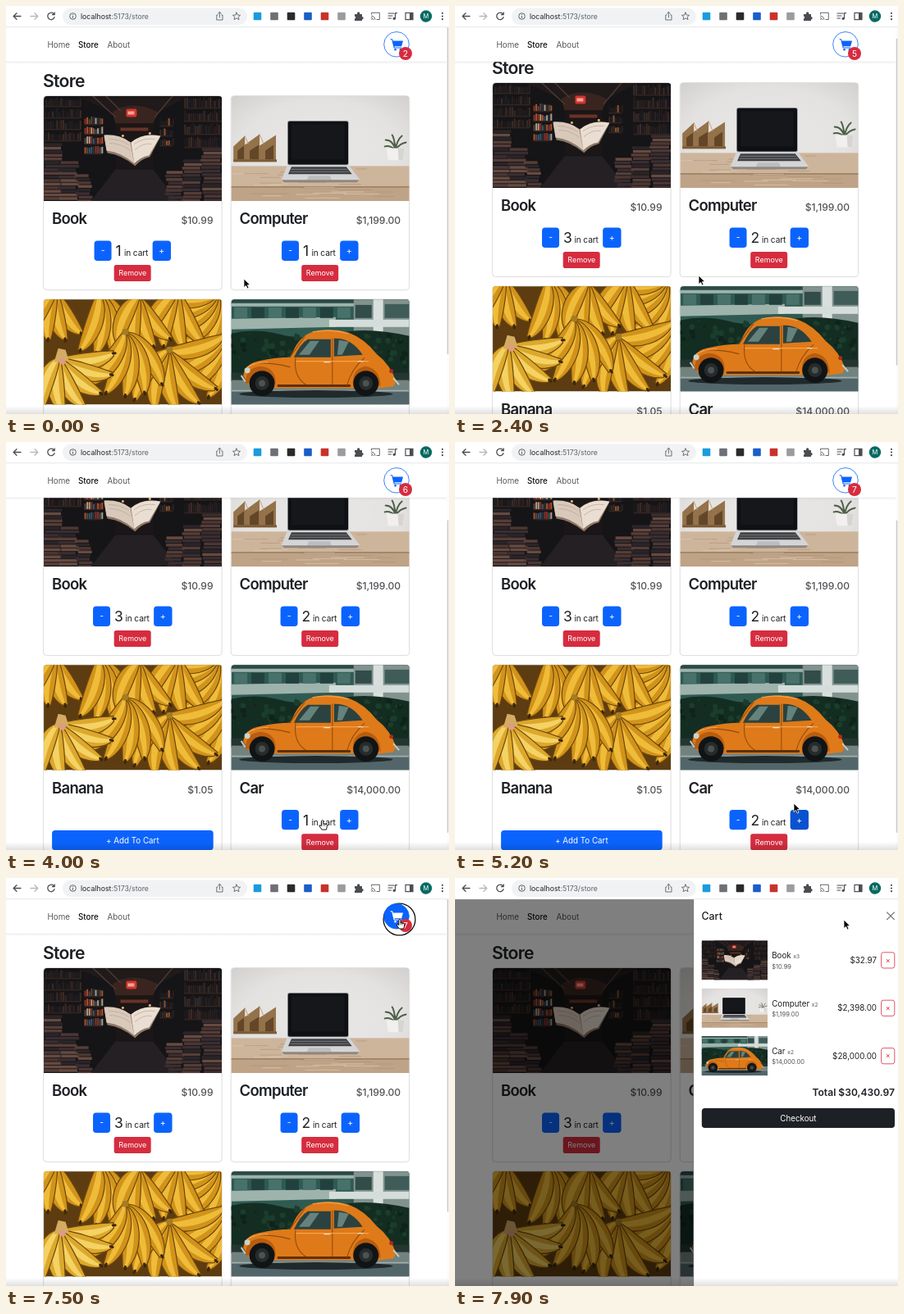
Animation of 540 by 498 pixels, one loop 8000 ms. Source, as an HTML page:

```html
<!DOCTYPE html>
<html lang="en">
<head>
<meta charset="utf-8">
<title>Store</title>
<style>
html, body { margin: 0; width: 100%; height: 100%; overflow: hidden; background: #fff; }
svg { display: block; }
#stage { width: 540px; height: 498px; }
text { font-family: Inter, Roboto, "Liberation Sans", sans-serif; white-space: pre; }
</style>
</head>
<body>
<svg id="stage" viewBox="0 0 540 498"></svg>
<script>
const LOOP = 8000, BLUE = '#0b63fd', DARK_BLUE = '#0a52cf', RED = '#d62c3f', INK = '#1d2024', MUTED = '#505357';

// Markup helpers
const text = (x, y, s, size, fill = INK, more = '') =>
  `<text x="${x}" y="${y}" font-size="${size}" fill="${fill}" ${more}>${s}</text>`;
const rect = (x, y, w, h, fill, more = '') =>
  `<rect x="${x}" y="${y}" width="${w}" height="${h}" fill="${fill}" ${more}/>`;
const circle = (x, y, r, fill, more = '') => `<circle cx="${x}" cy="${y}" r="${r}" fill="${fill}" ${more}/>`;
const path = (d, fill, more = '') => `<path d="${d}" fill="${fill}" ${more}/>`;
const line = (d, color, w = 1, more = '') =>
  path(d, 'none', `stroke="${color}" stroke-width="${w}" stroke-linecap="round" stroke-linejoin="round" ${more}`);
const group = (id, body, more = '') => `<g id="${id}" ${more}>${body}</g>`;
const MID = 'text-anchor="middle"', END = 'text-anchor="end"', TITLE = 'font-weight="600" letter-spacing="-.75"';

function randomizer(seed) {
  return () => (seed = (seed * 16807) % 2147483647) / 2147483647;
}

// Pictures, each 218 by 129
function library() {
  const rnd = randomizer(77);
  const pick = list => list[Math.floor(rnd() * list.length)];
  let s = rect(0, 0, 218, 129, '#151417');
  const shelf = (x0, x1, y0, y1, step, colors) => {
    for (let y = y0; y < y1; y += step) {
      s += rect(x0, y + step - 1.5, x1 - x0, 1.5, '#33251f');
      for (let x = x0; x < x1; x += 2.6) {
        const h = (step - 3) * (0.6 + 0.4 * rnd());
        s += rect(x.toFixed(1), (y + step - 1.5 - h).toFixed(1), 2, h.toFixed(1), pick(colors));
      }
    }
  };
  const dim = ['#1d1a1d', '#2b2222', '#3a2b26', '#1f2025', '#2a1d1b'];
  const vivid = ['#a9512b', '#b39d84', '#35566c', '#8c3328', '#57463c', '#27303a'];
  shelf(0, 46, 0, 56, 14, dim);
  shelf(172, 218, 0, 64, 16, dim);
  shelf(50, 72, 24, 72, 12, vivid);
  shelf(142, 158, 26, 62, 12, dim.concat('#8a5433'));
  s += path('M40 0H178L140 20H84Z', '#201a1a') + path('M84 20Q108 4 140 20L134 34H88Z', '#39241f');
  s += line('M60 0L88 26M158 0L136 26M76 0L94 18', '#4b3832', 1.5);
  s += rect(101, 16, 13, 10, '#d0362c', 'rx="2"') + rect(103, 19, 8, 4, '#f3a29a');
  s += rect(88, 34, 46, 55, '#1b1617') + rect(94, 39, 34, 4, '#6b3325') + circle(97, 49, 1.5, '#f2ba73') + circle(130, 46, 1.5, '#f2ba73');
  s += path('M58 129L88 90H134L164 129Z', '#242023');
  const pile = (x, y, n, w) => {
    for (let i = 0; i < n; i++)
      s += rect((x + rnd() * 5).toFixed(1), y + i * 4.4, w, 3.5, pick(['#4c3733', '#3a2d30', '#664a40', '#2a2528', '#563d37']));
  };
  pile(-3, 58, 16, 22); pile(17, 80, 11, 22); pile(38, 96, 8, 17);
  pile(148, 92, 9, 20); pile(168, 78, 12, 22); pile(192, 64, 15, 24);
  s += path('M74 50Q92 48 107 57Q122 44 143 50L130 75Q120 77 112 86Q96 72 78 70Z', '#8d7766');
  s += path('M74 48Q94 47 106 57L111 83Q96 69 77 67Z', '#d9c9bb') + path('M107 57Q122 45 143 49L129 73Q118 75 111 83Z', '#eaded2');
  return s + line('M80 53Q94 53 104 60M81 58Q95 58 106 67M111 59Q122 51 136 53M112 66Q122 57 132 59', '#b8a596', 0.7);
}

function desk() {
  let s = rect(0, 0, 218, 129, 'url(#wall)') + rect(0, 86, 218, 27, '#cdb59b') + rect(0, 111, 218, 18, '#bfa386') + rect(0, 111, 218, 1.2, '#8f7458');
  const rnd = randomizer(9);
  for (let i = 0; i < 26; i++) {
    const x = rnd() * 200, y = 88 + rnd() * 40;
    s += line(`M${x.toFixed(1)} ${y.toFixed(1)}h${(10 + rnd() * 35).toFixed(1)}`, i % 2 ? '#b2947a' : '#dcc8b2', 0.7);
  }
  s += path('M3 80V62L17 49V60L35 47V61L55 48V80Z', '#94724a') + path('M8 78V67L16 61V78ZM23 78V67L34 60V78ZM42 78V67L52 60V78Z', '#634628');
  s += line('M17 49L21 59M35 47L40 59', '#c4a377') + rect(3, 78, 53, 3, '#7b5c38');
  s += rect(69, 30.5, 75, 55, '#9b9da0', 'rx="2.5"') + rect(69.8, 31.2, 73.4, 53, '#0e1014', 'rx="2"') + rect(74, 35, 65, 43, '#15171b');
  s += path('M69 85H144L157 102Q157 105 153 105H66Q62 105 62 102Z', '#d5d5d5') + path('M74 87H141L148 96H70Z', '#3e4044') + path('M95 98H121L123 103H93Z', '#bcbdbe');
  s += line('M74 90H142M73 93H144', '#9b9da0', 0.6) + path('M62 103H157L154 106H65Z', '#8f8780');
  s += line('M201 66Q198 54 189 54M201 66Q200 52 197 48M201 66Q203 54 209 49M201 66Q207 58 214 57M201 66Q194 60 188 62', '#4e6049', 2);
  return s + path('M190 64H212L210 79H192Z', '#f1f0ee') + path('M204 64H212L210 79H205Z', '#d7d5d2');
}

function fruit() {
  let s = rect(0, 0, 218, 129, '#5c3c10');
  // Fans of bananas, all curling the same way from one stem
  const bunch = (x, y, from, to, n, len, bend, pale) => {
    for (let i = 0; i < n; i++) {
      const a = (from + (to - from) * i / (n - 1)) * Math.PI / 180;
      const c = Math.cos(a), d = Math.sin(a);
      const at = (u, v) => `${(x + c * u - d * v).toFixed(1)} ${(y + d * u + c * v).toFixed(1)}`;
      const body = w => `M${at(0, 0)}C${at(len * 0.2, bend - w)} ${at(len * 0.75, bend - w)} ${at(len, -w / 4)}` +
        `L${at(len, w / 4)}C${at(len * 0.75, bend + w)} ${at(len * 0.2, bend + w)} ${at(0, 2)}Z`;
      s += path(body(13), pale ? '#dca82c' : '#d1931a', 'stroke="#6d460c" stroke-width="1.2"') + path(body(5), pale ? '#f4d263' : '#efbc3a');
      s += line(`M${at(len - 1, 0)}L${at(len + 2, 0)}`, '#3b260d', 3);
    }
    s += circle(x, y, 4, '#a57c22');
  };
  bunch(16, -10, 60, 120, 4, 60, 8);
  bunch(214, -6, 105, 180, 5, 72, -9);
  bunch(165, -10, 65, 125, 4, 70, 8);
  bunch(68, -8, 62, 108, 4, 74, -8);
  bunch(118, -4, 55, 115, 4, 64, 9);
  bunch(222, 44, 105, 165, 4, 78, -10);
  bunch(154, 62, 40, 125, 5, 74, 10);
  bunch(100, 40, 55, 125, 5, 78, -9);
  bunch(20, 72, -5, 110, 6, 66, 9, true);
  return s + path('M13 77L18 60L27 62L31 75Z', '#d3ab63') + circle(23, 76, 4, '#df9b83');
}

function street() {
  let s = rect(0, 0, 218, 129, '#2f5a52') + rect(0, 0, 218, 6, '#2b4a46') + path('M0 5H218V9H0ZM0 24L128 22V34L0 37Z', '#9db3ac');
  for (let x = 4; x < 150; x += 21) s += rect(x, 10, 16, 13, x % 2 ? '#22413e' : '#47716a');
  s += path('M150 0H218V46H150Z', '#82938f') + rect(174, 0, 12, 54, '#d9dfdc') + rect(120, 25, 98, 9, '#d5ddda') + rect(188, 6, 30, 17, '#3f5c58') + rect(152, 7, 20, 16, '#314c49');
  const rnd = randomizer(31);
  s += path('M0 42Q30 35 60 43T128 42T218 45V101H0Z', '#142d22');
  for (let i = 0; i < 90; i++)
    s += circle((rnd() * 218).toFixed(1), (42 + rnd() * 46).toFixed(1), (1 + rnd() * 3).toFixed(1), i % 3 ? '#1b3d2b' : '#0f231b');
  s += rect(0, 90, 218, 10, '#24362f') + rect(0, 99, 218, 13, '#72827f') + rect(0, 111, 218, 18, '#52666a') + rect(0, 111, 218, 2, '#a0aca8');
  s += `<ellipse cx="104" cy="116" rx="94" ry="4.5" fill="#202a2c"/>`;
  s += path('M15 94Q17 78 37 75Q55 71 73 71Q81 48 97 41Q121 34 144 41Q163 48 178 67Q195 80 202 101L198 107L181 109H24Z', '#de7a19');
  s += path('M77 71Q85 54 94 49H122V71ZM126 48Q147 47 161 68L126 70Z', '#2b4240') + path('M83 68L97 51H108L96 68ZM132 50L144 52L136 68H130Z', '#66827c');
  s += line('M124 48V104M79 72Q76 95 92 105H142Q147 86 163 72M72 71L90 46M30 78Q54 78 72 83', '#964a0f', 1.1);
  s += path('M54 108Q58 84 36 82Q17 84 18 103H54ZM150 108Q146 86 164 82Q182 84 183 106Z', '#b85d0f');
  s += line('M58 106H145', '#5f300b', 3) + line('M20 83Q32 76 45 77M100 40Q120 36 143 42M80 76H168', '#f6a24a', 1.2);
  for (const x of [38, 165])
    s += circle(x, 103, 15.5, '#111415') + circle(x, 103, 8.5, '#262b2c') + circle(x, 103, 4, '#4c5251');
  s += circle(20, 87, 3.5, '#cdd2c8') + line('M13 94L17 100M199 97L205 104', '#c3cbc7', 2) + circle(196, 88, 2.5, '#b5281c');
  return s + line('M114 77H121M156 76H161', '#e7e1d0', 1.3);
}

const pictures = { Book: library, Computer: desk, Banana: fruit, Car: street };
const goods = [
  { name: 'Book', price: 10.99, x: 45.3, y: 109.2, base: 1, clicks: [900, 1100] },
  { name: 'Computer', price: 1199, x: 273.8, y: 109.2, base: 1, clicks: [1900] },
  { name: 'Banana', price: 1.05, x: 45.3, y: 357.5, base: 0, clicks: [] },
  { name: 'Car', price: 14000, x: 273.8, y: 357.5, base: 0, clicks: [4000, 4700] }
];
const money = v => '$' + v.toLocaleString('en-US', { minimumFractionDigits: 2, maximumFractionDigits: 2 });
const picture = (name, x, y, w, h, more = '') => `<use href="#pic${name}" x="${x}" y="${y}" width="${w}" height="${h}" ${more}/>`;

const button = (id, w, s) =>
  group(id, rect(0, 177.4, w, 24.4, BLUE, 'rx="3.8"') + text(w / 2, 193.2, s, 10.5, '#fff', MID));

function card({ name, price, x, y }) {
  return `<g transform="translate(${x} ${y})">` +
    rect(0.4, 0.4, 217.4, 237, '#fff', `id="frame${name}" rx="4" stroke="#d3d4d5" stroke-width=".8"`) +
    picture(name, 0.4, 0.4, 217.4, 128.6, 'clip-path="url(#top)"') +
    text(10.8, 157.2, name, 18.5, INK, TITLE) +
    text(207.3, 157, money(price), 12.1, MUTED, `font-weight="500" ${END}`) +
    group('add' + name, rect(10.8, 176.5, 196.6, 24.2, BLUE, 'rx="3.8"') + text(109, 192, '+ Add To Cart', 9.8, '#fff', MID)) +
    group('qty' + name,
      button('minus' + name, 21, '-') + button('plus' + name, 22.4, '+') +
      text(0, 196, '', 17.5, INK, `id="num${name}"`) + text(0, 196, 'in cart', 10.2, INK, `id="in${name}" letter-spacing="-.15" ${END}`) +
      rect(86.4, 206.8, 45, 20, RED, 'rx="2.8"') + text(109, 220.2, 'Remove', 9, '#fff', MID)) +
    '</g>';
}

function browserBar() {
  const G = '#5f6368';
  let s = rect(0, 0, 540, 26, '#fff') + rect(0, 25.4, 540, 0.7, '#dcdee0');
  s += line('M18 12.5H9.5M13 8.7L9.2 12.5L13 16.3', '#4a4d51', 1.3) + line('M30 12.5H38.5M35 8.7L38.8 12.5L35 16.3', '#b7b9bc', 1.3);
  s += line('M58.5 10A4.2 4.2 0 1 0 59 13.7M59.2 7.8V10.6H56.4', '#4a4d51', 1.3);
  s += rect(69, 2.5, 225, 20.5, '#f0f2f4', 'rx="10.2"') + circle(81.5, 12.5, 3.8, 'none', `stroke="${G}"`) + line('M81.5 12.3V14.4M81.5 10.4V10.5', G);
  s += text(91, 15.6, 'localhost<tspan fill="#5f6368">:5173/store</tspan>', 8.75, '#202124');
  s += line('M258 11H256.8V17H264V11H262.8M260.4 14V7.5M258.4 9.3L260.4 7.3L262.4 9.3', G, 0.9);
  s += line('M281 8L282.4 11L285.6 11.3L283.2 13.4L284 16.6L281 14.9L278 16.6L278.8 13.4L276.4 11.3L279.6 11Z', G, 0.9);
  [[306.5, '#1b9cdc'], [327, '#6d7074'], [347.5, '#2b2b2b'], [368, '#1b5ec9'], [388.5, '#c9322b'], [409, '#9a9c9f']]
    .forEach(([x, c]) => s += rect(x - 4.8, 7.7, 9.6, 9.6, c, 'rx="1"'));
  s += path('M425 10H428V9A1.7 1.7 0 0 1 431.4 9V10H434V13A1.7 1.7 0 0 1 434 16.4V18H425V15.5A1.6 1.6 0 0 0 425 12.4Z', '#4a4d51');
  s += line('M445.5 10V8.2H455.3V16.5H452M445.5 16.5V16.4M445.5 14.4Q447.5 14.5 447.6 16.5M445.5 12.2Q449.7 12.4 449.8 16.5', G);
  s += line('M466 9H473M466 12H471M466 15H469.5M474.5 15V8.6H476.5', '#4a4d51', 1.2) + circle(473.2, 15.3, 1.6, '#4a4d51');
  s += rect(487, 8.4, 9, 8.2, 'none', 'stroke="#4a4d51" stroke-width="1.2"') + rect(492, 8.4, 4, 8.2, '#4a4d51');
  s += circle(512, 12.5, 7.2, '#066a62') + text(512, 15.2, 'M', 7.5, '#fff', MID);
  return s + [8.8, 12.5, 16.2].map(y => circle(532, y, 1.1, '#4a4d51')).join('');
}

function navbar() {
  return rect(0, 68, 537, 3, 'url(#shade)') + rect(0, 26, 537, 42, '#fff') + rect(0, 67.6, 537, 0.6, '#ececec') +
    text(50.5, 50.6, 'Home', 9.8, '#55585b') + text(88, 50.6, 'Store', 9.8, '#0d0e0f', 'font-weight="500"') + text(123.5, 50.6, 'About', 9.8, '#55585b') +
    circle(479.5, 50.5, 19.4, '#fff', 'id="ring" stroke="#111" stroke-width="1.3"') +
    circle(476, 46.8, 15.3, '#fff', `id="cartDisc" stroke="${BLUE}" stroke-width=".8"`) +
    group('cartIcon', path('M471 42.6H484L482.2 49.3H472.6Z', 'currentColor') +
      line('M469 40.8H470.8L473.2 51H482', 'currentColor', 1.1) + circle(474.6, 53.3, 1.3, 'currentColor') + circle(481, 53.3, 1.3, 'currentColor')) +
    circle(487, 58, 8, RED) + text(487, 61.7, '', 10.3, '#fff', `id="badge" ${MID}`);
}

function cartPanel() {
  let s = rect(291, 26, 249, 472, '#fff') + rect(290.4, 26, 0.7, 472, '#777') +
    text(300.5, 50.8, 'Cart', 12.4, INK, 'font-weight="500"') + line('M526.6 41.8L535.4 50.6M535.4 41.8L526.6 50.6', '#666', 1.1);
  let total = 0;
  goods.filter(g => g.base + g.clicks.length).forEach((g, i) => {
    const n = g.base + g.clicks.length, y = 76.2 + i * 58.4;
    total += n * g.price;
    s += picture(g.name, 300.8, y, 80.2, 48.2) +
      text(386.2, y + 22, `${g.name} <tspan font-size="6.6" fill="${MUTED}">x${n}</tspan>`, 9.8) +
      text(386.2, y + 34.4, money(g.price), 7.5, MUTED) + text(514, y + 27.8, money(n * g.price), 9.8, INK, END) +
      rect(519.6, y + 14.6, 16.2, 19.2, '#fff', `rx="2.6" stroke="${RED}" stroke-width=".8"`) + text(527.7, y + 27.4, '×', 9, RED, MID);
  });
  return s + text(536, 265.6, 'Total ' + money(total), 12.1, INK, `font-weight="600" ${END}`) +
    rect(300.8, 281, 235.2, 24, '#1d2025', 'rx="3.8"') + text(418.4, 296.6, 'Checkout', 9.8, '#fff', MID);
}

const stage = document.getElementById('stage');
stage.innerHTML = `<defs>
  <radialGradient id="wall" r=".75"><stop stop-color="#e9e8e6"/><stop offset=".6" stop-color="#e4e2e0"/><stop offset="1" stop-color="#cfcdcb"/></radialGradient>
  <linearGradient id="shade" x2="0" y2="1"><stop stop-color="#000" stop-opacity=".06"/><stop offset="1" stop-color="#000" stop-opacity="0"/></linearGradient>
  <linearGradient id="floor" y1="1" x2="0" y2="0"><stop stop-color="#000" stop-opacity=".12"/><stop offset="1" stop-color="#000" stop-opacity="0"/></linearGradient>
  <clipPath id="top"><path d="M.4 129V4.4a4 4 0 0 1 4-4h209.4a4 4 0 0 1 4 4V129Z"/></clipPath>
  ${Object.entries(pictures).map(([n, draw]) =>
    `<symbol id="pic${n}" viewBox="0 0 218 129" preserveAspectRatio="xMidYMid slice">${draw()}</symbol>`).join('')}
</defs>` +
  rect(0, 0, 540, 498, '#fff') +
  group('page', text(45, 98.6, 'Store', 21.2, INK, TITLE) + goods.map(card).join('')) +
  navbar() +
  rect(536.8, 26, 3.2, 472, '#fcfcfc') + rect(537.8, 0, 1.5, 0, '#c9c9c9', 'id="thumb" rx=".7"') +
  rect(0, 26, 540, 472, '#000', 'id="shadeOver"') +
  group('panel', cartPanel()) + browserBar() +
  rect(0, 488, 540, 10, 'url(#floor)') +
  group('arrow', path('M0 0V10.6L2.5 8.3L4.2 12L6 11.2L4.4 7.6H7.7Z', '#000', 'stroke="#fff" stroke-width=".8"')) +
  group('hand', path('M-1.2 1.2Q0-.6 1 1.2V4.5L5 5.4Q6 6 5.7 8L4.8 12H-.6L-3.6 7.8Q-4 6.3-2.6 6.6L-1.2 7.6Z', '#fff', 'stroke="#000" stroke-width=".9"') +
    line('M1 4.5V7M3 5V7.2', '#000', 0.6));

const el = Object.fromEntries([...stage.querySelectorAll('[id]')].map(e => [e.id, e]));
const set = (id, attrs) => { for (const k in attrs) el[id].setAttribute(k, attrs[k]); };
const show = (id, on) => { el[id].style.display = on ? '' : 'none'; };
const within = (t, spans) => spans.some(([a, b]) => t >= a && t < b);

// Motion: [time, ...values]
const pointer = [[0, 290, 333], [200, 290, 333], [700, 190, 298], [1300, 190, 298], [1700, 418, 298], [2100, 418, 299],
  [2400, 297, 329], [2600, 297, 329], [3000, 193, 471], [3200, 193, 468], [3700, 384, 462], [4100, 386, 461],
  [4500, 418, 460], [4900, 418, 459], [5200, 413, 441], [5700, 412, 440], [6400, 414, 434], [7200, 480, 50], [7500, 480, 50], [7800, 474, 51]];
const scrolling = [[2300, 0], [2400, 16], [2700, 86], [5200, 86], [5400, 10], [5600, 10], [5700, 0]];
const sliding = [[7500, 0], [7800, 1]];
const fading = [[7500, 0], [7700, 0.5]];
const hands = [[600, 1400], [1700, 2200], [3000, 3300], [3600, 5000], [7100, 7700]];
const hovers = { plusBook: [[600, 1400]], plusComputer: [[1700, 2200]], plusCar: [[4400, 5300]], addCar: [[3600, 4000]] };

function track(keys, t) {
  const i = keys.findIndex(k => k[0] > t);
  if (i === 0) return keys[0].slice(1);
  if (i < 0) return keys[keys.length - 1].slice(1);
  const [a, b] = [keys[i - 1], keys[i]];
  const u = (t - a[0]) / (b[0] - a[0]), e = u * u * (3 - 2 * u);
  return a.slice(1).map((v, j) => v + (b[j + 1] - v) * e);
}

function render(t) {
  const [scroll] = track(scrolling, t);
  const count = g => g.base + g.clicks.filter(c => c <= t).length;
  const grown = count(goods[3]) ? 26 : 0;
  let sum = 0;
  goods.forEach((g, i) => {
    const n = count(g), w = n === 1 ? 93.5 : 96.5, left = 109 - w / 2, extra = i < 2 ? 26 : grown;
    sum += n;
    set('frame' + g.name, { height: 211 + extra });
    show('add' + g.name, !n);
    show('qty' + g.name, n);
    set('add' + g.name, { transform: `translate(0 ${extra})` });
    set('minus' + g.name, { transform: `translate(${left} 0)` });
    set('plus' + g.name, { transform: `translate(${left + w - 22.4} 0)` });
    set('num' + g.name, { x: left + 26 });
    set('in' + g.name, { x: left + w - 27.8 });
    el['num' + g.name].textContent = n;
  });
  for (const id in hovers)
    el[id].firstChild.setAttribute('fill', within(t, hovers[id]) ? DARK_BLUE : BLUE);
  el.badge.textContent = sum;

  set('page', { transform: `translate(0 ${-scroll})` });
  const ratio = 472 / (558 + grown);
  set('thumb', { y: 26 + scroll * ratio, height: 472 * ratio });

  const onCart = t >= 7100;
  set('cartDisc', { fill: onCart ? BLUE : '#fff' });
  el.cartIcon.style.color = onCart ? '#fff' : BLUE;
  show('ring', t >= 7400);

  const [slide] = track(sliding, t);
  show('panel', slide > 0);
  set('panel', { transform: `translate(${(1 - slide) * 249} 0)` });
  set('shadeOver', { opacity: track(fading, t)[0] });

  const [x, y] = track(pointer, t), hand = within(t, hands);
  show('hand', hand);
  show('arrow', !hand);
  set(hand ? 'hand' : 'arrow', { transform: `translate(${x} ${y})` });
}

const start = performance.now();
function tick() {
  const t = (performance.now() - start) % LOOP;
  render(Math.floor(t / 100) * 100);
  requestAnimationFrame(tick);
}
tick();
</script>
</body>
</html>
```
